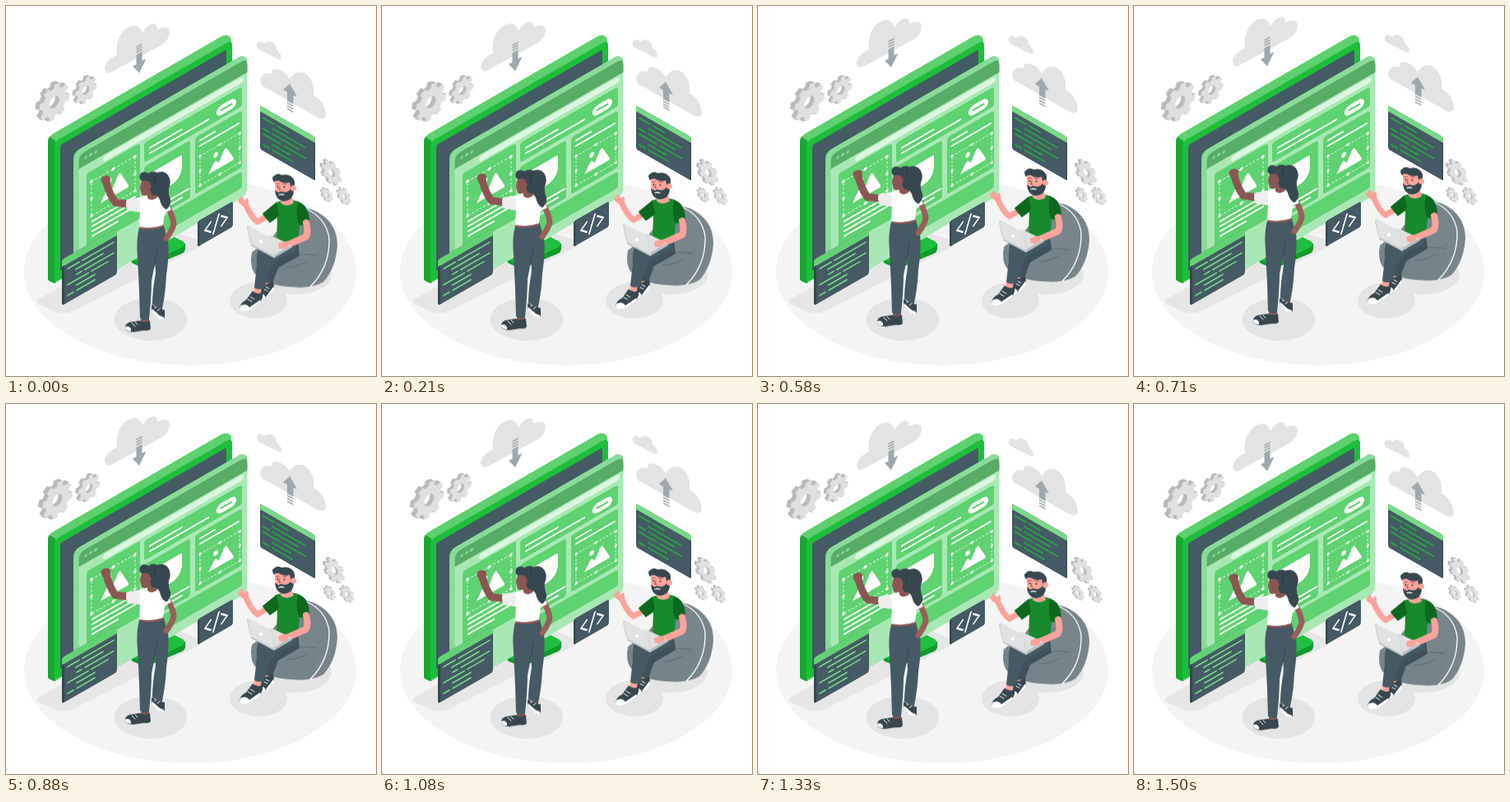
These frames come from a looping animation (450 px wide and 450 px high, 1.54 s). An HTML page:

```html
<!DOCTYPE html>
<html lang="en">
<head>
<meta charset="utf-8">
<title>Isometric web design</title>
<style>
html, body { margin: 0; width: 100%; height: 100%; overflow: hidden; background: #fff; }
svg { display: block; width: 100vw; height: 100vh; }
.float { animation: float 1540ms linear infinite; }
.shake { animation: shake 1540ms linear infinite; }
@keyframes float {
  0% { transform: translateY(-.24px); }
  47.4% { transform: translateY(-9px); }
  96.1% { transform: translateY(0); }
  100% { transform: translateY(-.72px); }
}
@keyframes shake {
  0% { transform: translateX(-.12px); }
  8.44%, 86.36% { transform: translateX(-.9px); }
  18.18%, 76.62% { transform: translateX(1.8px); }
  27.92%, 47.4%, 66.88% { transform: translateX(-3.6px); }
  37.66%, 57.14% { transform: translateX(3.6px); }
  96.1% { transform: translateX(0); }
  100% { transform: translateX(-.36px); }
}
.line { fill: none; stroke-linecap: round; stroke-linejoin: round; }
.dash { fill: none; stroke: #fff; stroke-width: .8; stroke-dasharray: 2.5 2; }
.card { fill: #5fd272; }
.slate { fill: #455a64; }
.dark { fill: #37474f; }
.ink { fill: #263238; }
.brown { fill: #8b5652; }
.skin { fill: #fba39b; }
.white { fill: #fff; }
</style>
</head>
<body>
<svg viewBox="0 0 450 450">
  <defs>
    <g id="picture">
      <rect class="dash" width="53" height="37"/>
      <path class="white" d="M-1.500-1.500h3v3h-3zM25-1.500h3v3h-3zM51.500-1.500h3v3h-3zM-1.500 17h3v3h-3zM51.500 17h3v3h-3zM-1.500 35.500h3v3h-3zM25 35.500h3v3h-3zM51.500 35.500h3v3h-3z"/>
      <path class="white" d="M11 29L19 18Q21 16 23 19L25 22L32 10Q34 7 36 10L45 27V29Z"/>
      <circle class="white" cx="21" cy="10" r="3.200"/>
    </g>
  </defs>

  <!-- floor and shadows -->
  <ellipse cx="224" cy="323" rx="202" ry="114" fill="#f4f4f4"/>
  <path d="M39 357L190 270L238 286Q239 291 234 294L80 372Q66 376 58 371L41 363Q36 360 39 357Z" fill="#e6e6e6"/>
  <g fill="#e4e4e4">
    <ellipse cx="176" cy="381" rx="44.500" ry="26"/>
    <ellipse cx="307" cy="358" rx="35" ry="22"/>
    <ellipse cx="351" cy="327" rx="45" ry="24"/>
  </g>

  <!-- monitor -->
  <path d="M153 307Q151 310 154 313L166 318Q171 319 176 317L214 301Q218 299 218 295V289L200 284Z" fill="#129a2b"/>
  <path d="M153 308L205 281L215 286Q219 289 215 293L175 313Q171 315 166 313Z" fill="#1fc13c"/>
  <path d="M51 166Q51 160 56 156L262 37Q270 33 274 40V200L60 337Q56 337 51 333Z" fill="#5dd06f"/>
  <path d="M51 166Q51 161 53 159L60 164V337Q57 337 51 333Z" fill="#17a733"/>
  <g transform="matrix(1 -.575 0 1 0 47.150)">
    <rect x="58.500" y="152" width="216.500" height="171" rx="6" fill="#1ebe3a"/>
    <rect x="66" y="160" width="202" height="153" rx="2" class="slate"/>

    <!-- browser window -->
    <path d="M82 345V186Q82 178 90 178H284Q288 178 293 185V200L92 349Z" fill="#8adb99"/>
    <rect x="88.500" y="185" width="205" height="166" rx="7" fill="#a9e8b4"/>
    <path d="M88.500 202V193Q88.500 185 96 185H286Q293.500 185 293.500 193V202Z" fill="#57ac66"/>
    <g fill="#82d291">
      <circle cx="97" cy="193" r="2"/><circle cx="103" cy="193" r="2"/><circle cx="109" cy="193" r="2"/>
    </g>
    <rect x="118" y="204" width="171" height="7" rx="3.500" fill="#dcf6e1"/>
    <g class="card">
      <rect x="98" y="213" width="65" height="92" rx="3"/>
      <rect x="168" y="216" width="119" height="24" rx="3"/>
      <rect x="168" y="245" width="56" height="70" rx="3"/>
      <rect x="230" y="245" width="57" height="69" rx="3"/>
      <rect x="168" y="319" width="119" height="20" rx="3"/>
    </g>
    <rect x="256" y="224" width="24" height="12" rx="6" class="white"/>
    <path class="line" d="M262 230H274" stroke="#5fd272" stroke-width="2.500"/>
    <use href="#picture" transform="translate(104 226) scale(1 1.13)"/>
    <use href="#picture" transform="translate(236 271) scale(.91 .97)"/>
    <path class="white" d="M177 257H212Q214 257 214 259V273Q212 286 200 286Q183 286 177 270Z"/>
    <path class="line" d="M175 226H214M175 232.500H246M236 252H254M236 258.500H283M105 275H157M105 281H157M105 287H157M105 293H136M176 303H222M176 309H214" stroke="#fff" stroke-width="2"/>
  </g>

  <!-- code panels -->
  <g transform="matrix(1 -.575 0 1 0 39.675)">
    <rect x="68" y="308" width="67" height="56" rx="3" class="slate"/>
    <path d="M68 317V311Q68 308 71 308H132Q135 308 135 311V317Z" fill="#63d275"/>
    <path d="M68 317H71V364Q68 363 68 361Z" class="dark"/>
    <path class="line" d="M75 323H89M93 323H131M85 329.500H118M86 336H92M96 336H131M75 342.500H100M104 342.500H124M86 349H108M75 355.500H82M86 355.500H108" stroke="#72d683" stroke-width="1.900"/>
  </g>
  <g transform="matrix(1 .575 0 1 0 -177.675)">
    <rect x="309" y="121" width="67" height="53" rx="2.500" class="slate"/>
    <path d="M309 128V123Q309 121 311 121H374Q376 121 376 123V128Z" fill="#78d987"/>
    <path d="M374.500 128H376V173L374.500 174Z" class="dark"/>
    <path class="line" d="M313 134H326M330 134H343M324 140.500H364M313 147H320M324 147H356M313 153.500H334M338 153.500H364M324 160H346M313 166.500H320M324 166.500H348" stroke="#22ae3b" stroke-width="1.900"/>
  </g>
  <g transform="matrix(1 -.575 0 1 0 133.975)">
    <rect x="233" y="262" width="43" height="31" rx="2.500" class="slate"/>
    <path d="M233 264L235.500 263V293Q233 293 233 291Z" class="dark"/>
    <path class="line" d="M249 272L242 278L249 284M259 268L252 288M262 272L269 278L262 284" stroke="#fff" stroke-width="2"/>
  </g>

  <g class="shake" id="gears"></g>

  <!-- clouds and arrows -->
  <g class="float">
    <g fill="#e3e3e3">
      <path d="M122 81Q118 77 122 70Q127 63 135 60Q133 49 138 38Q144 26 155 24Q163 24 166 33Q172 23 179 22Q184 22 184 29Q191 24 198 28Q201 35 194 44L189 48L128 81Q124 83 122 81Z"/>
      <path d="M312 98Q307 91 311 86Q316 80 323 83Q322 77 329 77Q338 78 345 89Q351 79 361 81Q372 86 374 100V109Q388 117 389 133Q387 140 379 136L318 101Z"/>
      <path d="M307 53Q303 48 306 45Q310 42 314 46Q319 41 326 46Q329 49 329 54Q335 58 335 64Q333 67 329 64Z"/>
    </g>
    <g fill="#9ea8ad">
      <path d="M158.500 60L165.500 56V67L170.500 64.500L162 82L154 73.500L158.500 71.500ZM158.500 49.500L165.500 46V47.800L158.500 51.300ZM158.500 52.800L165.500 49.300V51.100L158.500 54.600ZM158.500 56L165.500 52.500V54.300L158.500 57.800Z"/>
      <path d="M345 95L354 110.500L349.500 109V120L342 116V105L337 102ZM342 117.500L349.500 121.500V123.300L342 119.300ZM342 121L349.500 125V126.800L342 122.800ZM342 124.400L349.500 128.400V130.200L342 126.200Z"/>
    </g>
  </g>

  <!-- designer -->
  <g class="float">
    <path class="brown" d="M181 358H190V373L183 370ZM164 377H174V389H164Z"/>
    <path class="dark" d="M178 363Q180 367 185 368Q190 370 193 370V380Q189 382 185 379L178 371Q176 367 178 363ZM145 391Q145 387 150 385L163 383Q168 386 175 383L176 393Q174 396 168 395L155 397Q147 397 145 393Z"/>
    <path class="white" d="M145 391Q149 388 152 393L152 396Q146 396 145 392ZM178 369L187 377L192 379V381Q188 382 185 380L178 372Z"/>
    <path class="line" d="M153 386L157 390M157 385L160 388M181 368L184 366M184 371L187 369" stroke="#fff" stroke-width="1"/>
    <path class="slate" d="M180 283L182 325Q178 348 178 363Q184 369 190 368Q194 350 195 328Q199 301 197 285L192 268Z"/>
    <path class="slate" d="M162 270Q158 285 160 306L162 347L163 380Q169 384 174 381Q177 352 177 335L184 298L194 286L192 267Z"/>
    <path class="line" d="M184 297L180 318" stroke="#37474f" stroke-width="1"/>
    <path class="line" d="M196 244Q203 256 204 265Q203 272 195 283" stroke="#9a5f5b" stroke-width="7"/>
    <path class="brown" d="M163 264H191L192 269Q176 275 162 271Z"/>
    <path class="line" d="M154 242L133 239.500Q126 230 122 215" stroke="#8b5652" stroke-width="9"/>
    <path class="brown" d="M116 214Q114 209 120 207Q126 206 127 210L126 218L119 219Z"/>
    <path class="white" d="M147 236Q159 235 170 231L187 232Q196 235 201 248L193 252L191 267Q177 272 162 269L163 251L148 249Q145 242 147 236Z"/>
    <path d="M147 236Q155 235 162 235Q164 244 162 251L148 249Q145 242 147 236Z" fill="#ededed"/>
    <path class="brown" d="M166 211Q163 217 163 222L165 230Q169 232 172 230V234Q178 239 184 233L182 213Z"/>
    <path class="dark" d="M163 211Q161 206 165 203Q169 201 173 204Q179 200 184 203Q192 200 197 206Q202 213 198 222Q197 229 200 236Q201 243 195 248Q189 245 187 236Q185 230 178 230Q174 226 176 218Q174 212 168 213Q164 214 163 211Z"/>
    <circle class="brown" cx="174" cy="220" r="2.600"/>
    <path class="line" d="M183 206Q179 211 181 217" stroke="#263238" stroke-width=".8"/>
  </g>

  <!-- developer -->
  <g class="float">
    <path d="M351 248Q369 243 385 255Q403 268 403 292Q401 320 386 336Q374 344 346 342Q315 340 302 325Q296 316 299 300L325 280Z" fill="#78868c"/>
    <path d="M300 303Q325 298 354 306Q374 306 382 294Q382 317 369 342Q320 345 302 325Q297 315 300 303Z" fill="#75838a"/>
    <path d="M358 303Q365 301 378 304M342 318Q355 318 366 311" class="line" stroke="#5d6c73"/>
    <path class="line" d="M364 247Q389 257 393 283Q394 318 370 342" stroke="#fff" stroke-width="1.300"/>

    <path class="skin" d="M312 330H321V343H312ZM302 341H312V354H302Z"/>
    <path class="dark" d="M312 337Q317 342 324 334Q327 340 325 345L316 356Q311 359 309 355Z"/>
    <path class="white" d="M309 351Q315 350 316 356Q311 360 308 356ZM325 342L326 345L317 357L316 354Z"/>
    <path class="dark" d="M300 347Q305 352 312 349Q313 355 310 359L297 369Q288 373 284 368Q285 361 292 358Z"/>
    <path class="white" d="M285 365Q292 361 296 367L309 358L310 360L298 369Q288 374 284 369Z"/>
    <path class="line" d="M294 357L299 360M297 354L302 357M314 345L318 347M316 342L320 344" stroke="#fff" stroke-width="1"/>
    <path d="M322 302Q315 315 312 335Q319 340 325 335L331 319L357 304L355 287L334 292Z" fill="#3f525c"/>
    <path class="slate" d="M308 294Q304 302 305 316L302 343Q308 347 314 343L320 325Q324 313 333 308L354 298L352 286L326 291Z"/>

    <path class="line" d="M319 255L306 263Q299 259 291 241" stroke="#fba39b" stroke-width="7"/>
    <path class="skin" d="M286 232Q288 232 290 237L293 234Q296 235 295 242L289 244Q283 241 282 237Z"/>
    <path d="M329 239Q343 234 355 238Q367 243 368 257L366 268L357 267L355 290Q341 296 329 286L330 258L321 264Q315 258 312 253Z" fill="#168a2c"/>
    <path d="M329 239L332 255L321 264Q315 258 312 253ZM355 239Q368 242 369 261Q364 267 356 266Q352 253 355 239Z" fill="#0d681f"/>
    <path class="line" d="M365 264Q368 275 365 281L340 292" stroke="#fba39b" stroke-width="8"/>
    <path class="skin" d="M334 231L347 229L350 240Q341 246 334 240Z"/>
    <path class="skin" d="M327 215Q327 211 337 209L348 211L350 228Q346 236 336 236Q327 234 327 215Z"/>
    <path class="dark" d="M326 215Q322 209 326 207Q330 203 335 206Q344 204 348 209Q353 213 350 222L347 224L345 215Q337 217 332 213Q328 212 326 215Z"/>
    <path class="dark" d="M327 224Q331 229 334 226L340 227Q345 226 347 221L350 226Q349 237 338 238Q328 237 327 224Z"/>
    <circle class="skin" cx="349.500" cy="222" r="3.500"/>
    <path class="line" d="M332 230Q335 229 338 230" stroke="#fff" stroke-width="1.300"/>
    <path class="line" d="M328.500 217L332 216.500M337 217L341 217M333 220L331.800 224L334 224" stroke="#7b4546" stroke-width=".8"/>
    <circle class="ink" cx="330.500" cy="220" r=".9"/><circle class="ink" cx="338.500" cy="220.500" r=".9"/>

    <path d="M298 290L325 303L348 291V294L326 307L298 292Z" fill="#b8bdc0"/>
    <path d="M300 289L321 279L347 291L325 304Z" fill="#e0e0e0"/>
    <path d="M295 268L320 281Q323 283 324 286L327 306L299 291Q297 289 296 286L293 271Q293 267 295 268Z" fill="#d5d9db"/>
    <path d="M296 269L320 281Q322 283 323 286L325 303L299 290L295 271Z" fill="#e0e2e3"/>
    <circle cx="310" cy="287" r="2.200" fill="#fff"/>
    <path class="skin" d="M331 290Q337 286 345 287L343 293Q337 298 332 295Z"/>
  </g>
</svg>
<script>
const NS = "http://www.w3.org/2000/svg";
const gears = document.getElementById("gears");

function ring(r) {
  return `M${r} 0A${r} ${r} 0 1 0 ${-r} 0A${r} ${r} 0 1 0 ${r} 0Z`;
}

function gearPath(r, teeth = 8) {
  const pts = [];
  for (let i = 0; i < teeth; i++) {
    for (const [k, f] of [[-.31, .78], [-.22, 1], [.22, 1], [.31, .78]]) {
      const a = (i + k) / teeth * 2 * Math.PI + .2;
      pts.push((Math.cos(a) * r * f).toFixed(2) + " " + (Math.sin(a) * r * f).toFixed(2));
    }
  }
  return "M" + pts.join("L") + "Z" + ring(r * .32);
}

// Stacked copies of the face make the thickness.
function gear(x, y, r, slope, depth) {
  for (let d = depth; d >= 0; d -= .5) {
    const p = document.createElementNS(NS, "path");
    p.setAttribute("d", gearPath(r));
    p.setAttribute("fill-rule", "evenodd");
    p.setAttribute("fill", d ? "#bababa" : "#e0e0e0");
    p.setAttribute("transform", `matrix(.866 ${slope} 0 1 ${x - d} ${y - d * .4})`);
    gears.append(p);
  }
}

gear(59, 117, 21.5, -.5, 5);
gear(97.5, 102.5, 15.5, -.5, 3.5);
gear(396.5, 203, 14, .5, 3);
gear(391, 230, 8, .5, 2);
gear(412, 231.5, 9.5, .5, 2);
</script>
</body>
</html>
```
